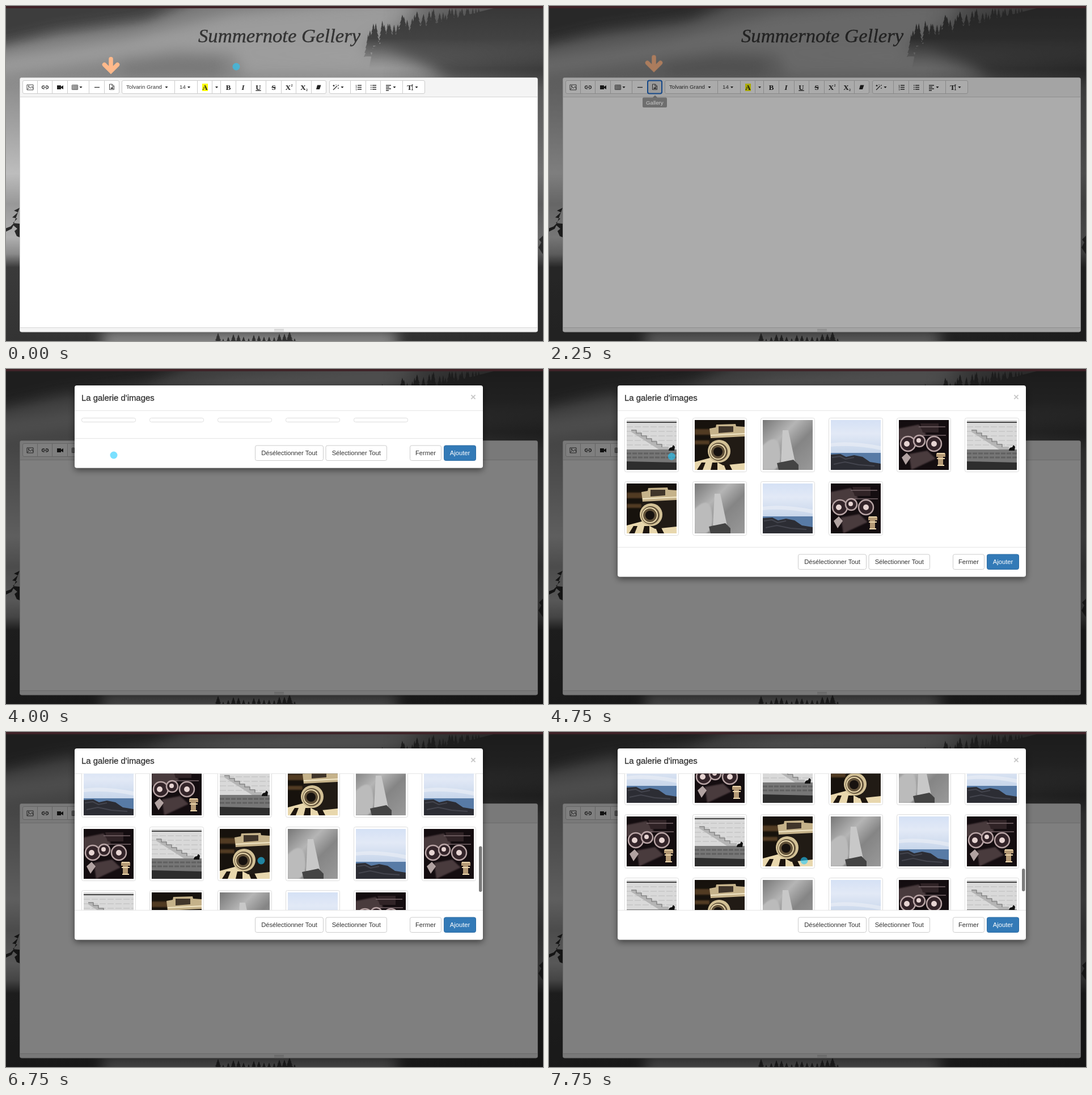
Recreate the animation shown at these times as an HTML page. Size 947x591 px, loop 8 s.

```html
<!DOCTYPE html>
<html lang="fr">
<head>
<meta charset="utf-8">
<title>Summernote Gellery</title>
<style>
  html, body { margin: 0; width: 100%; height: 100%; overflow: hidden; background: #333; }
  svg { display: block; width: 100%; height: 100%; }
  text { font-family: "Liberation Sans", sans-serif; font-size: 9.7px; fill: #333; }
  .title { font: italic 34.7px "Liberation Serif", serif; stroke: #333; stroke-width: .4px; }
  .glyph { font: bold 13px "Liberation Serif", serif; text-anchor: middle; fill: #222; }
  .heading { font-size: 14.9px; stroke: #333; stroke-width: .3px; }
  .label { font-size: 11.2px; text-anchor: middle; }
  .line { fill: none; stroke: #333; stroke-width: 1.3; }
  .thin { stroke-width: .9; }
  .button { fill: #fff; stroke: #ccc; }
  #arrow {
    animation: bounce 2s infinite paused;
    animation-delay: calc(-.2s - var(--t, 0) * 1ms);
  }
  @keyframes bounce {
    0%, 20%, 50%, 80%, 100% { transform: translateY(0); }
    40% { transform: translateY(-24px); }
    60% { transform: translateY(-12px); }
  }
</style>
</head>
<body>
<svg viewBox="0 0 947 591">
  <defs>
    <linearGradient id="mist" x2="0" y2="1">
      <stop offset="0" stop-color="#7a7a7a"/><stop offset=".2" stop-color="#868686"/>
      <stop offset=".36" stop-color="#a2a2a2"/><stop offset=".5" stop-color="#bdbdbd"/>
      <stop offset=".59" stop-color="#989898"/><stop offset=".69" stop-color="#b0b0b0"/>
      <stop offset=".74" stop-color="#8a8a8a"/><stop offset=".78" stop-color="#3a3a3a"/>
      <stop offset="1" stop-color="#333"/>
    </linearGradient>
    <linearGradient id="shade">
      <stop offset=".7" stop-color="#222" stop-opacity="0"/>
      <stop offset="1" stop-color="#222" stop-opacity=".5"/>
    </linearGradient>
    <linearGradient id="firs" gradientUnits="userSpaceOnUse" x1="0" y1="5" x2="0" y2="110">
      <stop offset="0" stop-color="#383838"/><stop offset=".5" stop-color="#424242"/>
      <stop offset="1" stop-color="#666" stop-opacity="0"/>
    </linearGradient>
    <linearGradient id="seaSky" x2="0" y2="1">
      <stop offset="0" stop-color="#d5e1f5"/><stop offset=".4" stop-color="#e2e9f6"/>
      <stop offset="1" stop-color="#c6d5ea"/>
    </linearGradient>
    <linearGradient id="greySky" x2="1" y2="1">
      <stop offset="0" stop-color="#777"/><stop offset=".35" stop-color="#b5b5b5"/>
      <stop offset=".6" stop-color="#858585"/><stop offset="1" stop-color="#999"/>
    </linearGradient>
    <filter id="soft" x="-50%" y="-100%" width="200%" height="300%"><feGaussianBlur stdDeviation="12"/></filter>
    <filter id="hazy"><feGaussianBlur stdDeviation="1.2"/></filter>
    <filter id="shadow" x="-10%" y="-30%" width="120%" height="160%">
      <feDropShadow dx="0" dy="4" stdDeviation="6" flood-color="#000" flood-opacity=".5"/>
    </filter>
    <clipPath id="bodyClip"><rect id="bodyBox" x="121" y="73.5" width="720"/></clipPath>

    <symbol id="pic0" viewBox="0 0 88 88">
      <rect width="88" height="88" fill="#d9d9d9"/>
      <path d="M0 12H88M0 20H88M0 28H88M0 36H88M0 44H88" stroke="#bcbcbc" stroke-dasharray="11 3"/>
      <path d="M0 4H88" stroke="#444" stroke-width="2"/>
      <path d="M8 17h9v5h9v5h9v5h9v5h9v5h9v5h12v7H60L8 21z" fill="#b5b5b5"/>
      <path d="M8 18h9v5h9v5h9v5h9v5h9v5h9v5" fill="none" stroke="#777" stroke-width="1.2"/>
      <path d="M0 52H88V88H0z" fill="#777"/>
      <path d="M0 59H88M0 66H88" stroke="#606060" stroke-width="3" stroke-dasharray="8 2"/>
      <path d="M0 73L88 75V88H0z" fill="#2d2d2d"/>
      <path d="M74 54q0-6 6-6l2-4 3 3-1 7z" fill="#111"/>
    </symbol>
    <symbol id="pic1" viewBox="0 0 88 88">
      <rect width="88" height="88" fill="#17120d"/>
      <path d="M0 16H30V26H0zM0 36H26V43H0z" fill="#513a23" filter="url(#hazy)"/>
      <path d="M0 74L30 66 88 76V88H0z" fill="#e8d7ad"/>
      <path d="M4 88l8-13h7l-5 13zM28 88l3-13h9v13zM55 88l-4-10h10l5 10z" fill="#1d150e"/>
      <path d="M27 31L88 27V76L50 80 28 68z" fill="#211b15"/>
      <path d="M26 15l11-2 1-5 34-1 1 4 15 1V29L28 32z" fill="#c5b28a"/>
      <path d="M42 11H68V21L42 23z" fill="#40352a"/>
      <path d="M28 27L88 24" stroke="#f2e6c6" stroke-width="2"/>
      <circle cx="43" cy="55" r="20" fill="#d3c196"/>
      <circle cx="42" cy="56" r="16" fill="#62523a"/>
      <circle cx="41" cy="56" r="13" fill="none" stroke="#ead9ae" stroke-width="2"/>
      <circle cx="41" cy="56" r="8" fill="#17120f"/>
    </symbol>
    <symbol id="pic2" viewBox="0 0 88 88">
      <rect width="88" height="88" fill="url(#greySky)"/>
      <path d="M0 45Q25 20 30 50T20 88H0z" fill="#bbb" filter="url(#hazy)"/>
      <path d="M35 18L45 18 57 74H32z" fill="#c8c8c8"/>
      <path d="M25 76L54 70 63 79V88H28z" fill="#444"/>
    </symbol>
    <symbol id="pic3" viewBox="0 0 88 88">
      <rect width="88" height="60" fill="url(#seaSky)"/>
      <path d="M0 41Q35 36 88 46V53Q40 43 0 47z" fill="#edf0f7" opacity=".6"/>
      <rect y="58" width="88" height="30" fill="#587ba6"/>
      <path d="M0 61L17 60 27 65 41 62 56 65 69 74 88 77V88H0z" fill="#2c2d34"/>
      <path d="M2 66l14-2 10 5 15-3M5 78l20-4 24 5 28 2" fill="none" stroke="#44454e" stroke-width="2"/>
    </symbol>
    <symbol id="pic4" viewBox="0 0 88 88">
      <rect width="88" height="88" fill="#140d10"/>
      <path d="M0 15L35 8 48 25 25 42 0 35zM18 60L50 54 65 68 22 88z" fill="#4a3a3e" filter="url(#hazy)"/>
      <path d="M38 6H70V22H42z" fill="#302326"/>
      <path d="M35 12H82M42 27H83" stroke="#77656a" stroke-width="1.5"/>
      <g fill="#332429" stroke="#b8a4a5" stroke-width="2.5">
        <circle cx="16" cy="42" r="13"/><circle cx="36" cy="37" r="10"/>
        <circle cx="62" cy="42" r="13"/>
      </g>
      <g fill="#e6d4d2">
        <circle cx="14" cy="42" r="5"/><circle cx="35" cy="36" r="4"/><circle cx="62" cy="42" r="5"/>
        <path d="M5 66l9-8 7 8-9 13z" opacity=".75"/>
      </g>
      <path d="M66 59H82V65H78V80H69V65H66z" fill="#b59a76"/>
      <path d="M67 59H81M67 68H81M68 80H80" stroke="#ecd6ad" stroke-width="2"/>
    </symbol>
  </defs>

  <rect width="947" height="591" fill="url(#mist)"/>
  <g filter="url(#soft)">
    <path d="M-30 -20H350L250 24 90 46 -30 74z" fill="#3d3d3d"/>
    <path d="M-30 96L210 58 400 12 740 -20 700 30 640 60 620 100 300 80 -30 125z" fill="#a2a2a2" opacity=".85"/>
    <path d="M200 92L380 84V125H210z" fill="#707070" opacity=".6"/>
    <path d="M400 80H730L760 125H420z" fill="#a0a0a0" opacity=".85"/>
    <path d="M670 75L760 20 970 0V130H790z" fill="#545454"/>
    <path d="M170 574H690V610H170z" fill="#8a8a8a"/>
  </g>
  <rect width="947" height="591" fill="url(#shade)"/>
  <path id="hill" fill="url(#firs)"/>
  <path id="lowTrees" fill="#303030"/>
  <path d="M24 356l-10 5 7 3-10 9 9 2-8 8 12 1v24l-5-2-4-9 5-4-7-6-3 6-10 5v-6l8-3 6-6M947 405l-7 7 4 5-5 9 8 12z" fill="#292929"/>

  <text class="title" x="339" y="64">Summernote Gellery</text>
  <path id="arrow" d="M185 93.5V114M173.5 103.5L185 115L196.500 103.5" fill="none" stroke="#ffb98b"
    stroke-width="7.5" stroke-linecap="round"/>

  <rect x="24.5" y="126.5" width="913" height="448.5" rx="3" fill="#fff" stroke="#ccc"/>
  <path d="M25 160V129q0-2 2-2H935q2 0 2 2V160zM25 568H937V574H25z" fill="#f4f4f4"/>
  <path d="M25 160.5H937M25 567.5H937" stroke="#d5d5d5"/>
  <path d="M473 570.5H490M473 573H490" stroke="#bbb"/>
  <g id="toolbar"></g>
  <rect id="focus" x="174" y="131.5" width="25" height="23" rx="3" fill="#e6e6e6" stroke="#1f6bcc" stroke-width="2"/>

  <g id="icons">
    <path class="line thin" d="M37 139H48V148H37zM38 147l3-4 2 2 3-3 2 4"/>
    <circle cx="40" cy="141.5" r="1"/>
    <path class="line" d="M68 140.8h-2a2.500 2.500 0 0 0 0 5h2M70 140.8h2a2.500 2.500 0 0 1 0 5h-2M66 143.3h6"/>
    <path d="M90 140h7v2.500l4-2.500v7l-4-2.500v2.500h-7z" fill="#222"/>
    <path class="line thin" d="M116.500 139.500h10v8h-10zM120 139v9M123.500 139v9M116 142.200h11M116 145h11"/>
    <path class="line" d="M156 143.500h9"/>
    <path class="line thin" d="M182.500 138h5l3 3v6.500h-8zM187 138v3.500h3.500"/>
    <path d="M184 146l1.500-2.500 1 1 1.500-2 1.500 3.500z" fill="#222"/>
    <rect x="346" y="137" width="10" height="13" fill="#ff0"/>
    <path d="M549 139.500h6.500l-2.500 7.500h-6z" fill="#222"/>
    <path class="line" d="M577 148l7-7M578 139v3M576.500 140.500h3M586 139v2M586 144v2M582 138.500v1"/>
    <path class="line" d="M620 140h7M620 143.500h7M620 147h7M646 140h7M646 143.500h7M646 147h7M670 140h9M670 143h6M670 146h9M670 149h5"/>
    <path class="line" d="M643 140h1.600M643 143.500h1.600M643 147h1.600"/>
    <path class="line thin" d="M716.500 139v9M715 139h3M715 148h3"/>
  </g>

  <rect id="backdrop" y="4" width="947" height="587"/>
  <rect width="947" height="4" fill="#402328"/>

  <g id="tooltip">
    <path d="M183 161.5l4-4 4 4H206q2 0 2 2V177q0 2-2 2H167q-2 0-2-2V163.5q0-2 2-2z"/>
    <text x="171" y="173.5" style="fill:#fff">Gallery</text>
  </g>

  <g id="modal">
    <rect id="sheet" x="121" y="29" width="720" rx="4" fill="#fff" filter="url(#shadow)"/>
    <text class="heading" x="133" y="56">La galerie d'images</text>
    <text x="824" y="55" text-anchor="middle" style="font-size:17px;font-weight:bold;fill:#c8c8c8">×</text>
    <path d="M121 73.5H841" stroke="#e5e5e5"/>
    <g clip-path="url(#bodyClip)">
      <g id="empty"></g>
      <g id="thumbs"></g>
    </g>
    <rect id="bar" x="834" width="5.5" rx="2.7" fill="#7b7b7b"/>
    <g id="footer"><path d="M121 .5H841" stroke="#e5e5e5"/></g>
  </g>
  <circle id="dot"/>
</svg>

<script>
const $ = id => document.getElementById(id);
const set = (el, attrs) => { for (const k in attrs) el.setAttribute(k, attrs[k]); };
const show = (el, on) => { el.style.display = on ? '' : 'none'; };
const rand = n => { const s = Math.sin(n * 127.1) * 43758.5; return s - Math.floor(s); };

// Scenery
function fir(x, top, h, w) {
  let left = '', right = '';
  for (let i = 1; i <= 5; i++) {
    const y = top + h * i / 5, half = w * i / 10;
    right += `L${x + half} ${y}L${x + half * .55} ${y - 1}`;
    left = `L${x - half * .55} ${y - 1}L${x - half} ${y}` + left;
  }
  return `M${x} ${top}${right}${left}z`;
}
let hill = 'M640 110L648 72 700 50 760 30 820 14 860 4H947V125H760z', low = '';
for (let i = 0; i < 34; i++) {
  const x = 634 + i * 6 + rand(i + 20) * 6;
  hill += fir(x, Math.max(4, 50 - i * 1.5 - rand(i) * 20), 40, 14 + rand(i + 50) * 10);
}
for (let i = 0; i < 16; i++) low += fir(374 + i * 9, 574 + rand(i + 9) * 13, 22, 18);
$('hill').setAttribute('d', hill);
$('lowTrees').setAttribute('d', low);

// Toolbar
const groups = [
  [29, 56, 82, 109, 147, 174, 200],
  [204, 298, 338, 364, 379, 406, 433, 459, 486, 512, 539, 565],
  [570, 608, 635, 661, 700, 739]
];
$('toolbar').innerHTML = groups.map(g => {
  const from = g[0], to = g[g.length - 1];
  const dividers = g.slice(1, -1).map(x => `M${x - .5} 131V155`).join('');
  return `<rect class="button" x="${from + .5}" y="131.5" width="${to - from - 1}" height="23" rx="2.5"/>
    <path d="${dividers}" stroke="#ccc"/>`;
}).join('');

const glyph = (x, s, style = '', y = 147.5) => `<text class="glyph" x="${x}" y="${y}" style="${style}">${s}</text>`;
const tiny = 'font-size:6px';
$('icons').innerHTML += '<text x="212" y="146">Tolvarin Grand</text><text x="306" y="146">14</text>'
  + glyph(351, 'A') + glyph(392, 'B') + glyph(418, 'I', 'font-style:italic')
  + glyph(445, 'U', 'text-decoration:underline') + glyph(472, 'S', 'text-decoration:line-through')
  + glyph(497.5, 'X') + glyph(504, '2', tiny, 142) + glyph(524, 'X') + glyph(530.5, '2', tiny, 150)
  + glyph(711.5, 'T') + [0, 1, 2].map(i => glyph(617.5, i + 1, 'font-size:4.5px', 141.5 + i * 3.5)).join('')
  + [132, 283, 322.5, 371.5, 593, 685, 724].map(x => `<path d="M${x - 2.5} 142h5l-2.5 3z" fill="#222"/>`).join('');

// Modal
const buttons = [
  [439, 121, 'Désélectionner Tout'], [563.5, 108.5, 'Sélectionner Tout'],
  [712, 56, 'Fermer'], [772, 57, 'Ajouter', true]
];
$('footer').innerHTML += buttons.map(([x, w, label, primary]) =>
  `<rect class="button" x="${x + .5}" y="13" width="${w - 1}" height="26.5" rx="3"
     ${primary ? 'style="fill:#337ab7;stroke:#2e6da4"' : ''}/>
   <text class="label" x="${x + w / 2}" y="30" ${primary ? 'style="fill:#fff"' : ''}>${label}</text>`).join('');

const PITCH = 112;
const frame = (i, y, h) =>
  `<rect class="button" style="stroke:#ddd" x="${133.5 + i % 6 * 120}" y="${y + .5}" width="95" height="${h - 1}" rx="3"/>`;
$('empty').innerHTML = [0, 1, 2, 3, 4].map(i => frame(i, 86, 8)).join('');
$('thumbs').innerHTML = Array.from({ length: 70 }, (_, i) => {
  const y = 86 + Math.floor(i / 6) * PITCH;
  return `<g>${frame(i, y, 96)}<use href="#pic${i % 5}" x="${137 + i % 6 * 120}" y="${y + 4}" width="88" height="88"/></g>`;
}).join('');
const thumbs = [...$('thumbs').children];

// Motion: rows of [time, ...values]
const pointer = [
  [0, 406, 107], [250, 380, 112], [500, 310, 130], [750, 225, 152], [1000, 183, 162], [1250, 180, 164],
  [3750, 180, 164], [4000, 190, 152], [5000, 225, 155], [5250, 254, 187], [5500, 361, 234], [5750, 450, 227]
];
const scroll = [[6000, 0], [6250, 30], [6500, 150], [6750, 367], [7000, 680], [7250, 949]];
const loaded = [[0, 0], [4250, 5], [4500, 10], [6250, 15], [6500, 25], [6750, 35], [7000, 55], [7250, 70]];
const dim = [[0, 0], [2250, .33], [2500, .5]];
const hint = [[0, 0], [1750, .9], [2250, .35], [2500, 0]];

const lastKey = (keys, t) => Math.max(0, keys.findLastIndex(k => k[0] <= t));
const hold = (keys, t) => keys[lastKey(keys, t)][1];
function glide(keys, t) {
  const i = lastKey(keys, t), a = keys[i], b = keys[i + 1] || a;
  const p = b === a ? 0 : Math.max(0, (t - a[0]) / (b[0] - a[0]));
  return a.slice(1).map((v, n) => v + (b[n + 1] - v) * p);
}

function draw(t) {
  document.documentElement.style.setProperty('--t', t);

  const [cx, cy] = glide(pointer, t);
  const ring = t >= 1250 && t < 1750;
  show($('dot'), t < 1750 || t >= 4000);
  set($('dot'), {
    cx, cy, r: ring ? 8 : 6.5,
    fill: ring ? 'none' : 'rgba(34,203,255,.6)',
    stroke: ring ? `rgba(60,185,245,${t < 1500 ? .6 : .3})` : 'none'
  });

  show($('focus'), t >= 1750);
  set($('tooltip'), { opacity: hold(hint, t) });
  set($('backdrop'), { opacity: hold(dim, t) });

  show($('modal'), t >= 2750);
  set($('modal'), { transform: `translate(0 ${t < 3000 ? -4 : 0})`, opacity: t < 3000 ? .95 : 1 });
  const count = hold(loaded, t), [top] = glide(scroll, t);
  const content = count ? Math.ceil(count / 6) * PITCH + 24 : 49;
  const height = Math.min(241, content);
  show($('empty'), !count);
  thumbs.forEach((el, i) => show(el, i < count));
  set($('thumbs'), { transform: `translate(0 ${-top})` });
  set($('bodyBox'), { height });
  set($('sheet'), { height: height + 96.5 });
  set($('footer'), { transform: `translate(0 ${73 + height})` });
  show($('bar'), t >= 6250);
  set($('bar'), { y: 76 + top / content * 238, height: 238 * 241 / content - 2 });
}

// The picture advances four times a second.
const STEP = 250, LOOP = 8000;
let start, shown = -1;
function tick(now) {
  start ??= now;
  const t = Math.floor((now - start) % LOOP / STEP) * STEP;
  if (t !== shown) draw(shown = t);
  requestAnimationFrame(tick);
}
draw(0);
requestAnimationFrame(tick);
</script>
</body>
</html>
```
